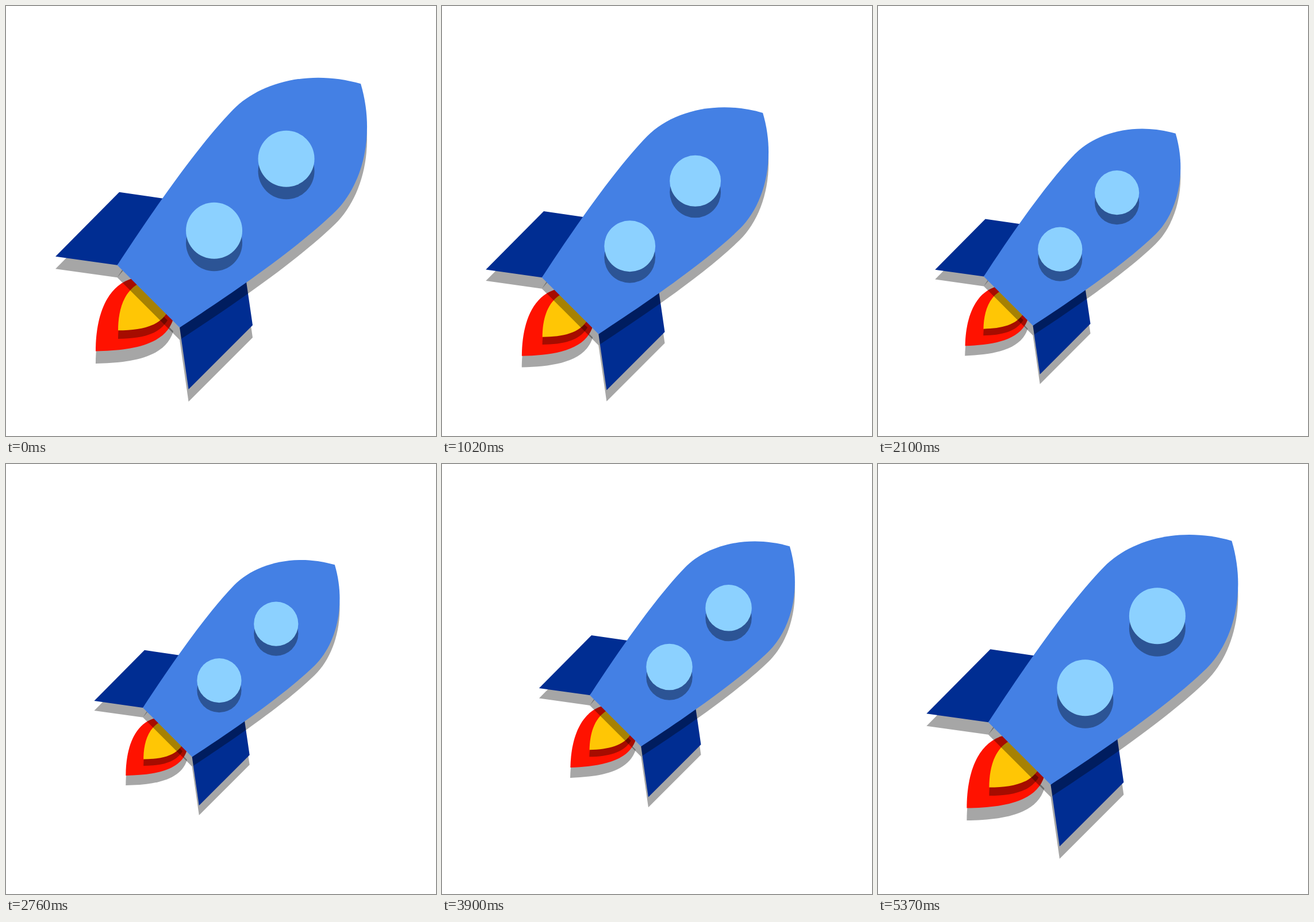
An HTML page that plays this animation: 748x748 px, repeating every 5.4 s.

```html
<!DOCTYPE html>
<html lang="en">
<head>
<meta charset="utf-8">
<title>Rocket</title>
<style>
  html, body { margin: 0; width: 100%; height: 100%; overflow: hidden; background: #fff; }
  svg { display: block; width: 100vw; height: 100vh; }
  .shade { fill: #000; fill-opacity: .35; }
</style>
</head>
<body>
<svg viewBox="0 0 748 748"><g id="rocket"></g></svg>
<script>
const LOOP = 5400, STEP = 30, LEG = LOOP / 3;
const rocket = document.getElementById('rocket');

function add(parent, tag, attrs) {
  const node = document.createElementNS('http://www.w3.org/2000/svg', tag);
  for (const name in attrs) node.setAttribute(name, attrs[name]);
  return parent.appendChild(node);
}

// A flat shape on top of its own hard shadow.
function shape(parent, d, fill, drop = 21.5) {
  add(parent, 'path', { d, class: 'shade', transform: `translate(0 ${drop})` });
  add(parent, 'path', { d, fill });
}

const circle = (x, y, r) => `M${x - r} ${y}a${r} ${r} 0 1 1 ${2 * r} 0a${r} ${r} 0 1 1 ${-2 * r} 0z`;

const flame = add(rocket, 'g', {});
shape(flame, 'M156 601C156 545 172 487 222 474L291 545C277 592 215 600 156 601z', '#ff1200');
shape(flame, 'M195 565C195 535 202 500 230 484L281 533C266 558 235 565 195 565z', '#ffc605', 14.5);
shape(rocket, 'M86 436.5L197 324.5L290 338L193.5 451.5z', '#002d92');
shape(rocket, 'M317.5 667.5L429 556L415.5 463.5L302 560z', '#002d92');
shape(rocket, 'M193.5 451.5C248 368 329 249 395 181C441 134 528 110 617 136' +
  'C643.5 225.5 619.5 312.5 572.5 358.5C504.5 424.5 385.5 505.5 302 560z', '#4480e4');
shape(rocket, circle(487.5, 266.5, 49), '#8cd1ff');
shape(rocket, circle(362, 391.5, 49), '#8cd1ff');

const clamp = p => Math.min(1, Math.max(0, p));

function smooth(from, to, t) {
  const p = clamp((t - from) / (to - from));
  return p * p * (3 - 2 * p);
}

// Same curve as cubic-bezier(.6, 0, .32, 1).
function glide(start, t) {
  const x = clamp((t - start) / LEG);
  let low = 0, high = 1;
  for (let i = 0; i < 24; i++) {
    const p = (low + high) / 2, q = 1 - p;
    if (1.8 * q * q * p + .96 * q * p * p + p * p * p < x) low = p;
    else high = p;
  }
  return low * low * (3 - 2 * low);
}

const wave = (t, period, peak) => Math.cos(2 * Math.PI * (t - peak) / period);

function render(time) {
  const t = Math.floor(time % LOOP / STEP) * STEP;
  const scale = 1 - .212 * (smooth(150, 2050, t) - smooth(3540, 4980, t));

  // Fall back, shoot ahead, return: all along the flight diagonal.
  const along = 96.5 - 109.5 * glide(50, t) + 160 * glide(LEG, t) - 50.5 * glide(2 * LEG, t);
  const shake = 3.8 * wave(t, 270, 76.5) - wave(t, 135, 76.5);
  const across = 715 + 38 * scale + shake;
  rocket.setAttribute('transform',
    `translate(${(across + along) / 2} ${(across - along) / 2}) scale(${scale}) translate(-424.75 -329)`);

  // The flame stretches along its axis from the nozzle.
  const stretch = 1.02 + .022 * wave(t, 200, 83);
  flame.setAttribute('transform',
    `translate(250 508) rotate(45) scale(1 ${stretch}) rotate(-45) translate(-250 -508)`);
}

const start = performance.now();
function tick() {
  render(performance.now() - start);
  requestAnimationFrame(tick);
}
tick();
</script>
</body>
</html>
```
